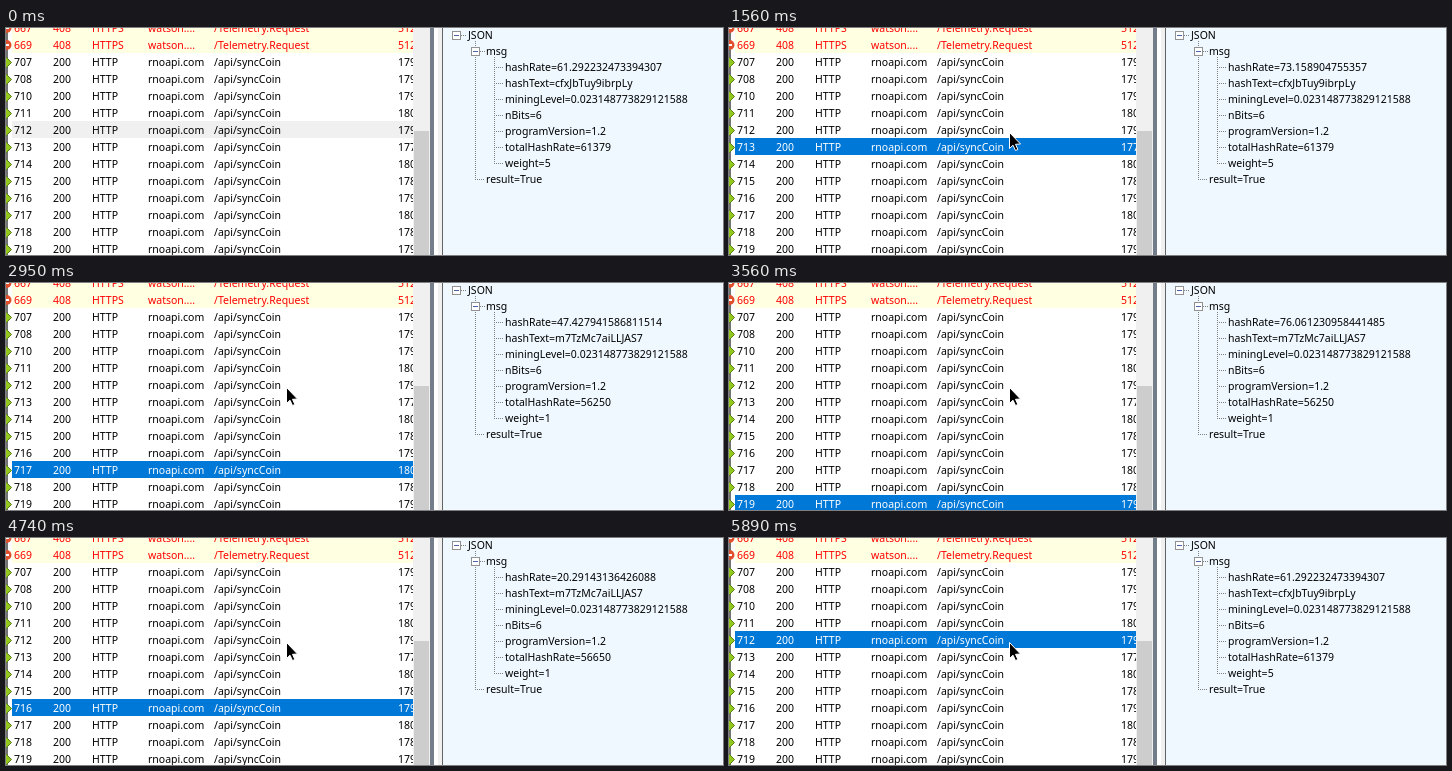
Animation, 717 px wide and 227 px high, one loop 7.38 s. Source, as an HTML page with a canvas:

```html
<!DOCTYPE html>
<html lang="en">
<head>
<meta charset="utf-8">
<title>Request list</title>
<style>
html, body { margin: 0; width: 717px; height: 227px; overflow: hidden; background: #fff; }
canvas { display: block; }
</style>
</head>
<body>
<canvas id="stage" width="717" height="227"></canvas>
<script>
const ctx = document.getElementById('stage').getContext('2d');
const LOOP = 7380;
const ROW_H = 17;
const FIRST = 712;
const FOCUS_AT = 930;
const FONT = '10.5px "Noto Sans", "Open Sans", sans-serif';

// visible start of each body size, from the top row down
const sizes = '179 179 179 180 179 177 180 178 179 180 178 179'.split(' ');

// hash rates of the requests from FIRST on
const rates = [
  '61.292232473394307', '73.158904755357', '84.713305928461072', '95.4036437474455',
  '20.29143136426088', '47.427941586811514', '58.906417320785963', '76.061230958441485'
];

// key presses: arrow down, then arrow up
const downAt = [1560, 1860, 2170, 2550, 2950, 3260, 3560];
const upAt = [4190, 4420, 4740, 4970, 5280, 5590, 5890];

// pointer tip: time, x, y; shown in steps of POINTER_STEP
const POINTER_STEP = 77;
const path = [
  [70, 398, 202], [301, 276, 117], [378, 271, 121], [455, 271, 121],
  [532, 279, 109], [686, 279, 109], [763, 280, 112], [917, 281, 105]
];

const passed = (times, t) => times.filter(at => t >= at).length;

function rect(x, y, w, h, color) {
  ctx.fillStyle = color;
  ctx.fillRect(x, y, w, h);
}

function label(str, x, cy, color = '#000') {
  ctx.fillStyle = color;
  ctx.fillText(str, x, cy + 4);
}

function dots(x, y, w, h) {
  ctx.fillStyle = '#808080';
  for (let i = 0; i < Math.max(w, h); i += 2) {
    ctx.fillRect(x + (w > h ? i : 0), y + (w > h ? 0 : i), 1, 1);
  }
}

function shape(points, fill, stroke) {
  ctx.beginPath();
  points.forEach(([x, y]) => ctx.lineTo(x, y));
  ctx.closePath();
  ctx.lineWidth = 1;
  ctx.strokeStyle = stroke;
  ctx.fillStyle = fill;
  ctx.fill();
  ctx.stroke();
}

function okIcon(cy) {
  shape([[0.5, cy - 5], [5.5, cy], [0.5, cy + 5], [-4.5, cy]], '#94c81e', '#557f14');
}

function errorIcon(cy) {
  ctx.beginPath();
  ctx.arc(0.5, cy, 5, 0, Math.PI * 2);
  ctx.fillStyle = '#e0502c';
  ctx.fill();
  rect(0, cy - 1, 3, 2, '#fff');
}

function line(cells, cy, color) {
  const columns = [8, 47, 86, 142, 208, 392];
  columns.forEach((x, i) => label(cells[i], x, cy, color));
}

function drawList(selected, focused) {
  ctx.save();
  ctx.beginPath();
  ctx.rect(0, 0, 407, 227);
  ctx.clip();
  rect(0, 0, 407, 227, '#fff');
  rect(6, 0, 401, 25, '#ffffe1');
  rect(0, 0, 2, 227, '#737373');
  [667, 669].forEach((id, i) => {
    const cy = i * ROW_H;
    errorIcon(cy);
    line([id, 408, 'HTTPS', 'watson....', '/Telemetry.Request', 512], cy, '#f00');
  });
  sizes.forEach((size, i) => {
    const id = 707 + i + (i > 1);
    const top = 25 + i * ROW_H;
    const on = id === selected;
    if (on) rect(6, top, 401, ROW_H, focused ? '#0078d7' : '#f0f0f0');
    okIcon(top + 9.5);
    line([id, 200, 'HTTP', 'rnoapi.com', '/api/syncCoin', size], top + 9,
      on && focused ? '#fff' : '#000');
  });
  ctx.restore();
}

function drawDivider() {
  rect(407, 0, 29, 227, '#f0f0f0');
  rect(408, 103, 15, 124, '#cdcdcd');
  rect(424, 0, 4, 227, '#747e8a');
  rect(428, 0, 4, 227, '#fff');
  rect(436, 0, 1, 227, '#646464');
}

function expander(cx, cy) {
  rect(cx - 4, cy - 4, 9, 9, '#919191');
  rect(cx - 3, cy - 3, 7, 7, '#fff');
  rect(cx - 2, cy, 5, 1, '#4b63a7');
}

function drawTree(selected) {
  const early = selected < 716;
  const total = early ? 61379 : selected === 716 ? 56650 : 56250;
  rect(437, 0, 280, 227, '#eff8ff');
  dots(455, 7, 6, 1);
  dots(469, 13, 1, 139);
  dots(474, 23, 5, 1);
  dots(469, 151, 10, 1);
  dots(488, 29, 1, 107);
  expander(450, 7);
  expander(469, 23);
  label('JSON', 462, 7);
  label('msg', 480, 23);
  [
    'hashRate=' + rates[selected - FIRST],
    'hashText=' + (early ? 'cfxJbTuy9ibrpLy' : 'm7TzMc7aiLLJAS7'),
    'miningLevel=0.023148773829121588',
    'nBits=6',
    'programVersion=1.2',
    'totalHashRate=' + total,
    'weight=' + (early ? 5 : 1)
  ].forEach((str, i) => {
    const cy = 39 + i * 16;
    dots(488, cy, 10, 1);
    label(str, 499, cy);
  });
  label('result=True', 480, 151);
}

function pointerAt(t) {
  const start = path[0][0];
  const at = start + Math.floor((t - start) / POINTER_STEP) * POINTER_STEP;
  const next = path.findIndex(p => p[0] > at);
  if (next < 0) return path[path.length - 1].slice(1);
  const [t0, x0, y0] = path[next - 1];
  const [t1, x1, y1] = path[next];
  const k = (at - t0) / (t1 - t0);
  return [x0 + (x1 - x0) * k, y0 + (y1 - y0) * k].map(Math.round);
}

function drawPointer(t) {
  if (t < path[0][0]) return;
  const [x, y] = pointerAt(t);
  ctx.save();
  ctx.translate(x - 0.5, y - 0.5);
  shape([[0, 0], [0, 16], [3.5, 12.7], [6, 18], [8.4, 17], [6, 11.8], [11, 11.5]],
    '#000', '#fff');
  ctx.restore();
}

function draw(t) {
  const selected = FIRST + passed(downAt, t) - passed(upAt, t);
  ctx.font = FONT;
  drawList(selected, t >= FOCUS_AT);
  drawDivider();
  drawTree(selected);
  drawPointer(t);
}

const start = performance.now();
function tick() {
  draw((performance.now() - start) % LOOP);
  requestAnimationFrame(tick);
}
tick();
</script>
</body>
</html>
```
